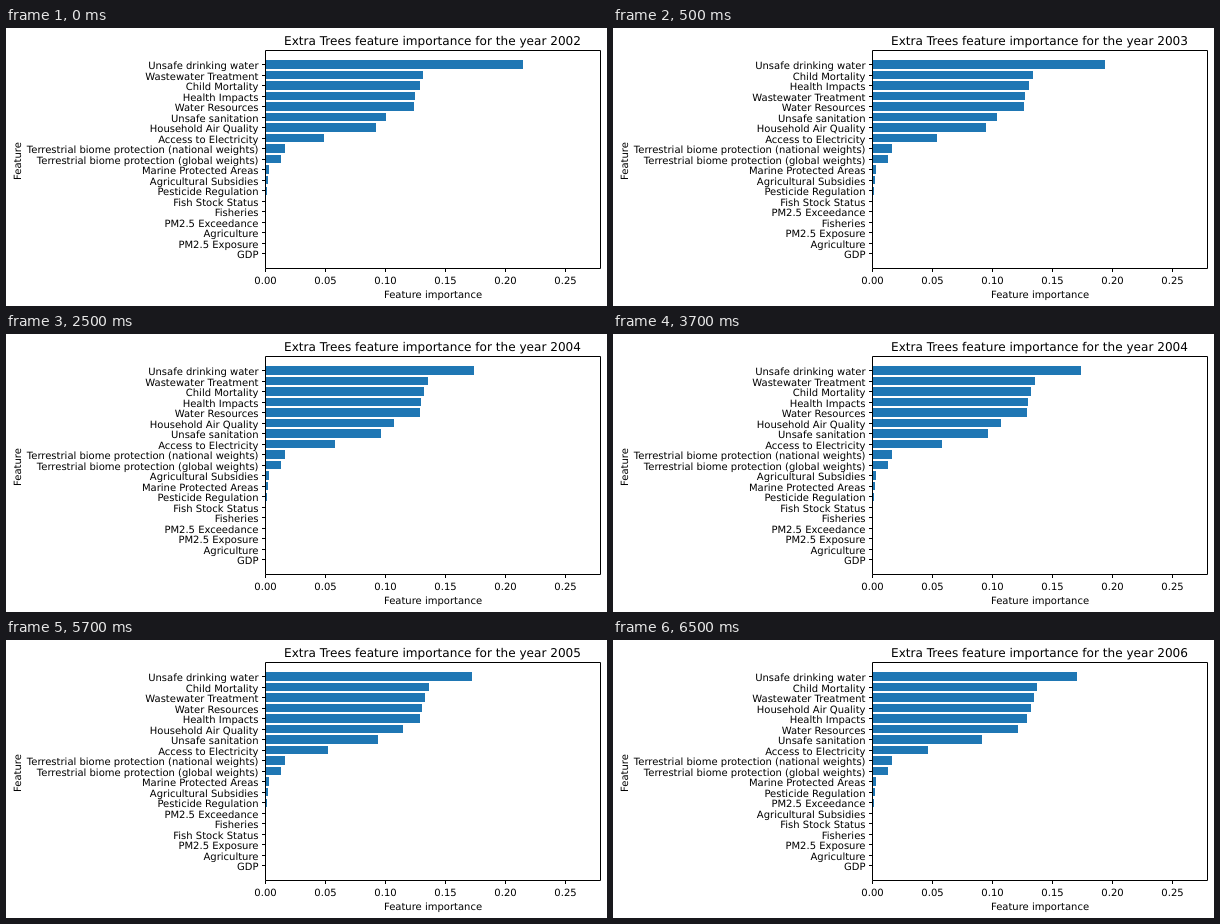
Recreate the animation shown at these times as an HTML page. Size 601 px wide and 278 px high, loop 8000 ms.

```html
<!DOCTYPE html>
<html lang="en">
<head>
<meta charset="utf-8">
<title>Feature importance by year</title>
<style>
html, body { margin: 0; width: 100%; height: 100%; overflow: hidden; background: #fff; }
svg { display: block; }
text { font: 10px "DejaVu Sans", sans-serif; text-rendering: geometricPrecision; text-anchor: middle; }
.title { font-size: 12.08px; }
.feature { text-anchor: end; }
.axes { fill: none; stroke: #000; }
</style>
</head>
<body>
<svg id="chart" width="601" height="278" viewBox="0 0 601 278"></svg>
<script>
const chart = document.getElementById('chart');
const LEFT = 259.5, TOP = 22.5, RIGHT = 594.5, BOTTOM = 240.5, SCALE = 1200;
const FIRST_ROW = 36.55, PITCH = 10.5145;

const features = [
  'Unsafe drinking water', 'Wastewater Treatment', 'Child Mortality', 'Health Impacts',
  'Water Resources', 'Unsafe sanitation', 'Household Air Quality', 'Access to Electricity',
  'Terrestrial biome protection (national weights)',
  'Terrestrial biome protection (global weights)',
  'Marine Protected Areas', 'Agricultural Subsidies', 'Pesticide Regulation',
  'Fish Stock Status', 'Fisheries', 'PM2.5 Exceedance', 'Agriculture', 'PM2.5 Exposure', 'GDP'
];

// Ranking per year, as letters that index the features.
const rankings = [
  'abcdefghijklmnopqrs', 'acdbefghijklmnporqs', 'abcdegfhijlkmnoprqs',
  'acbedgfhijklmponrqs', 'acbgdefhijkmplnorqs'
];

// Leading bars at the first, middle and last year; the small bars hardly change.
const keys = [
  [.2145, .131, .1285, .1238, .123, .1003, .092, .0487],
  [.173, .1353, .132, .1288, .1285, .107, .0962, .0579],
  [.1704, .137, .1338, .132, .1287, .1212, .0912, .0462]
];
const tail = [.0155, .0125, .0022, .0016, .0012];

function importance(year, rank) {
  if (rank >= keys[0].length) return tail[rank - keys[0].length] || 0;
  const k = Math.min(Math.floor(year / 2), 1);
  const from = keys[k][rank], to = keys[k + 1][rank];
  return from + (to - from) * (year / 2 - k);
}

function add(tag, attrs, content = '') {
  const node = document.createElementNS('http://www.w3.org/2000/svg', tag);
  for (const key in attrs) node.setAttribute(key, attrs[key]);
  node.textContent = content;
  return chart.appendChild(node);
}

const rows = features.map((_, i) => {
  const y = FIRST_ROW + i * PITCH;
  const top = Math.round(y - .4 * PITCH), bottom = Math.round(y + .4 * PITCH);
  return {
    tick: Math.floor(y) + .5,
    bar: add('rect', { x: 260, y: top, height: bottom - top, fill: '#1f77b4' }),
    label: add('text', { class: 'feature', x: 252.5, y: Math.ceil(y + 4) })
  };
});

let axes = `M${LEFT} ${TOP}H${RIGHT}V${BOTTOM}H${LEFT}Z`;
for (const row of rows) axes += `M${LEFT} ${row.tick}h-3.5`;
for (let i = 0; i < 6; i++) {
  const x = LEFT + i * 60;
  axes += `M${x} ${BOTTOM}v3.5`;
  add('text', { x, y: 256 }, (i * .05).toFixed(2));
}
add('path', { class: 'axes', d: axes });
add('text', { x: 427, y: 270 }, 'Feature importance');
add('text', { transform: 'translate(15 133) rotate(-90)' }, 'Feature');
const title = add('text', { class: 'title', x: 426.5, y: 17 });

let shown = -1;
function show(year) {
  if (year === shown) return;
  shown = year;
  title.textContent = `Extra Trees feature importance for the year ${2002 + year}`;
  rows.forEach(({ bar, label }, rank) => {
    label.textContent = features[rankings[year].charCodeAt(rank) - 97];
    bar.setAttribute('width', Math.round(importance(year, rank) * SCALE));
  });
}

const start = performance.now();
function frame() {
  const time = (performance.now() - start) % 8000;
  show(Math.floor((time + 1500) / 2000));
  requestAnimationFrame(frame);
}
frame();
</script>
</body>
</html>
```
